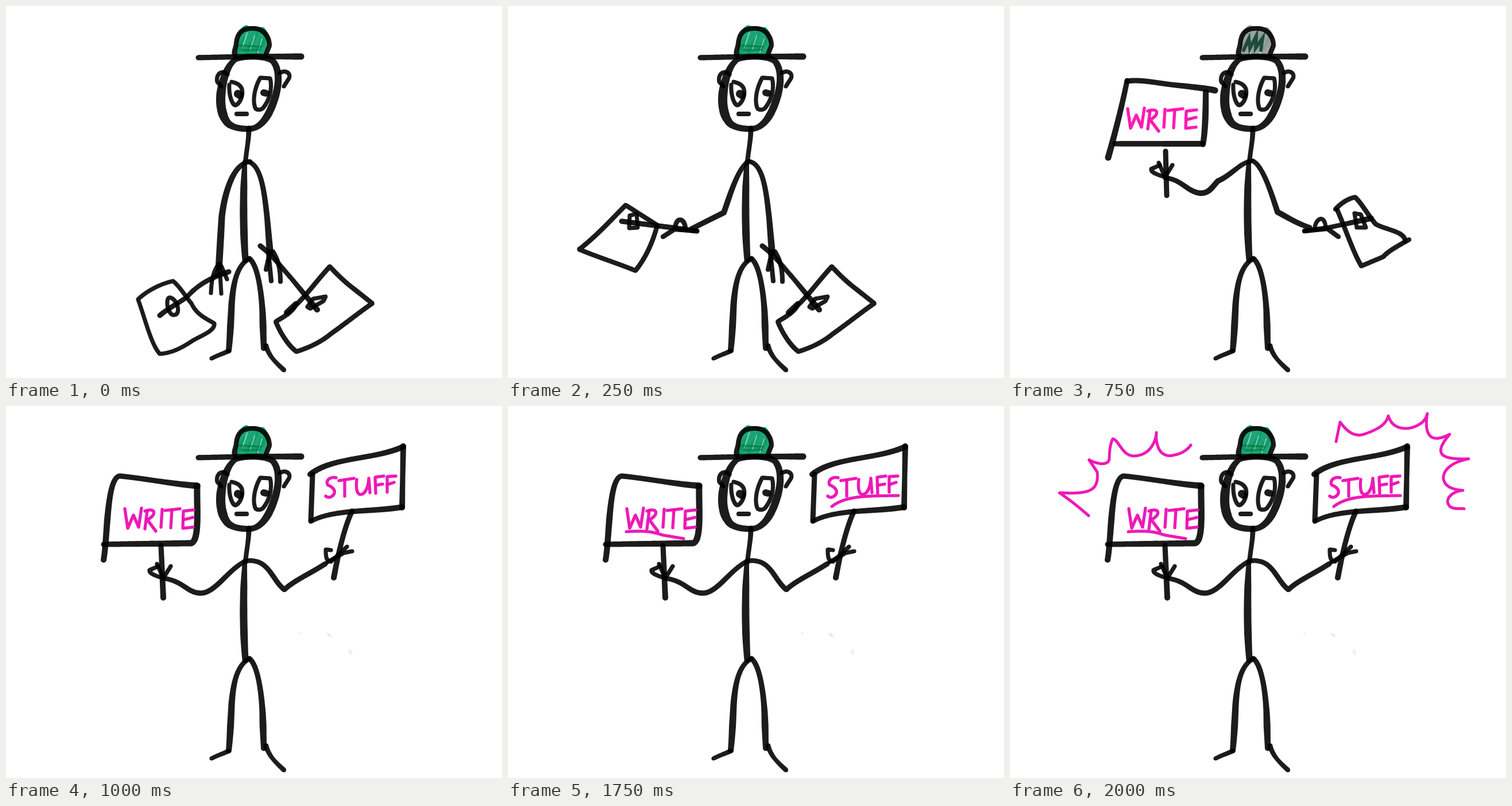
Recreate the animation shown at these times as an HTML page with a canvas. Size 864 by 648 pixels, loop 2.25 s.

```html
<!DOCTYPE html>
<html lang="en">
<head>
<meta charset="utf-8">
<title>Write stuff</title>
<style>
html, body { margin: 0; width: 100%; height: 100%; overflow: hidden; background: #fff; }
canvas { display: block; }
</style>
</head>
<body>
<canvas id="stage" width="864" height="648" role="img" aria-label="Stick figure raising signs: WRITE STUFF"></canvas>
<script>
const ctx = document.getElementById('stage').getContext('2d');
const track = document.createElementNS('http://www.w3.org/2000/svg', 'path');
const INK = 'rgba(0,0,0,.89)', PINK = 'rgba(236,14,180,.95)';
const STEP = 250, LOOP = 2250;
const BLEED = 1.2; // ink spreads a little beyond the nib
let color = INK;

// A marker stroke whose width runs through the given values along the path.
function pen(d, ...widths) {
  track.setAttribute('d', d);
  const length = track.getTotalLength(), last = widths.length - 1;
  const n = Math.max(1, Math.ceil(length / 1.2));
  ctx.fillStyle = color;
  ctx.beginPath();
  for (let i = 0; i <= n; i++) {
    const p = track.getPointAtLength(length * i / n);
    const u = last * i / n, k = Math.min(Math.floor(u), Math.max(0, last - 1));
    const w = last ? widths[k] + (widths[k + 1] - widths[k]) * (u - k) : widths[0];
    const r = (w + BLEED) / 2;
    ctx.moveTo(p.x + r, p.y);
    ctx.arc(p.x, p.y, r, 0, Math.PI * 2);
  }
  ctx.fill();
}
const pens = (w, ...paths) => paths.forEach(d => pen(d, w));

function smudge(x, y, rx, ry, alpha, turn = 0) {
  ctx.save();
  ctx.translate(x, y);
  ctx.rotate(turn);
  ctx.scale(rx, ry);
  const g = ctx.createRadialGradient(0, 0, 0, 0, 0, 1);
  g.addColorStop(0, `rgba(90,90,90,${alpha})`);
  g.addColorStop(1, 'rgba(90,90,90,0)');
  ctx.fillStyle = g;
  ctx.fillRect(-1, -1, 2, 2);
  ctx.restore();
}

function hatFill(grey) {
  ctx.save();
  ctx.clip(new Path2D('M401,85 C400,58 404,37 419,33 L424,36 L449,37 C459,46 460,62 456,72 L453,85 Z'));
  ctx.fillStyle = grey ? '#98a39f' : '#1ba679';
  ctx.fillRect(395, 30, 70, 60);
  ctx.lineCap = 'round';
  for (let i = 0; i < 13; i++) {
    const x = 402 + i * 4.4, y = 42 + (i * 17) % 23;
    ctx.strokeStyle = grey ? (i % 4 ? '#8b9994' : '#c0c9c5') : (i % 3 ? '#149966' : '#8ad6ba');
    ctx.lineWidth = i % 3 ? 3 : 2;
    ctx.beginPath();
    ctx.moveTo(x + 5, y);
    ctx.lineTo(x - 3, y + 24);
    ctx.stroke();
  }
  ctx.strokeStyle = grey ? '#1f4a3c' : 'rgba(0,118,55,.6)';
  ctx.lineWidth = grey ? 6 : 4;
  ctx.stroke(new Path2D(grey
    ? 'M407,77 L416,57 L418,74 L429,52 L428,73 L440,56 L437,77'
    : 'M407,69 L444,71 M411,77 L442,76'));
  ctx.restore();
}

function figure(greyHat) {
  hatFill(greyHat);
  pen('M399,85 C396,81 400,74 401,66 C403,42 417,39 430,39 C451,39 459,56 459,69 L453,84', 8, 7, 7, 7, 7);
  pen('M335,90 L425,88 L514,88', 8, 8, 8, 10);
  pen('M400,93 C383,104 374,140 374,163 C374,186 382,202 390,207 C402,214 414,214 425,214 ' +
      'C450,212 463,179 470,155 C477,130 475,108 465,96 C455,87 420,86 400,93',
      8, 12, 15, 15, 10, 9, 12, 12, 11, 10, 9, 8);
  pens(6, 'M386,119 C375,109 365,121 368,132 L375,140',
      'M477,117 C486,110 497,117 493,126 L484,140',
      'M389,137 C388,152 392,169 399,173 C407,171 414,156 411,145 C408,136 400,134 393,132',
      'M443,125 L460,126 C464,142 460,162 449,176 C446,181 439,182 435,179 C429,168 432,144 443,125');
  pen('M404,153 L407,155', 13);
  pen('M449,151 L453,152', 11);
  pen('M402,188 L419,188', 7);
  pen('M423,213 C423,235 419,250 417,272', 8, 7, 7);
  pen('M416,272 C413,330 413,390 417,442', 7, 11, 12, 12, 10);
  pen('M424,440 C403,451 396,480 393,520 C391,560 390,580 388,600', 7, 8, 10, 11, 9);
  pen('M388,601 C377,606 370,608 358,614', 7, 6);
  pen('M424,440 C439,452 445,500 447,535 L449,596', 8, 8, 9, 11, 9);
  pen('M453,592 C458,610 470,621 484,634', 8, 6, 7);
}

function rightArmDown() {
  pen('M421,271 C445,276 450,325 455,370 L460,430', 7, 8, 9, 11);
  pens(7, 'M460,428 L453,459', 'M457,430 L462,479', 'M465,428 C472,440 478,452 478,480');
  pen('M443,418 C462,432 480,455 500,478 L542,529', 8, 7, 9);
  pens(7, 'M564,454 C580,471 590,480 600,488 L638,518 C615,534 586,557 566,571 C548,586 528,595 506,602 ' +
       'C492,592 478,570 470,550 C480,543 495,537 505,521 C525,502 540,480 564,454');
  pen('M489,534 L505,519', 9);
  pens(6, 'M525,524 L535,510 L557,506 L553,514 L530,527 Z');
}

function leftArmDown() {
  pen('M425,271 C397,274 382,320 376,366 L371,452', 7, 9, 10, 11, 11);
  pens(6, 'M371,449 C360,463 358,480 357,500', 'M371,452 L367,470', 'M372,450 L375,501', 'M375,453 L385,476');
  pen('M388,463 C352,475 333,487 315,507 C300,518 285,525 268,539', 8, 7, 8);
  pens(6, 'M230,511 C242,499 265,485 291,479 C304,490 314,508 323,518 C332,538 350,545 363,553 ' +
       'C364,566 340,574 325,583 C308,594 292,604 268,606 C253,590 243,547 230,511');
  pens(6, 'M284,508 C278,512 281,533 290,538 C300,540 302,529 297,518 C293,511 288,507 284,508');
}

function leftArmSwing() {
  pen('M419,271 C402,280 388,325 376,360 L320,388', 7, 9, 8);
  pens(7, 'M329,392 L290,389 L270,402', 'M309,386 C307,370 294,366 291,386');
  pen('M329,392 L285,386 L198,375', 8);
  pens(7, 'M205,347 L260,382 C250,420 235,445 222,461 C190,448 155,437 124,424 C155,400 180,372 205,347');
  pens(6, 'M212,365 L224,362 L226,386 L211,387 Z');
}

function rightArmSwing() {
  pen('M423,270 C440,278 455,325 466,359 C485,369 500,379 522,386', 7, 8, 9, 8);
  pens(7, 'M513,392 L553,388 L572,402');
  pen('M513,392 L555,386 L629,370', 7, 7, 9);
  pens(6, 'M531,385 C534,369 548,363 550,386', 'M600,361 L611,363 L620,386 L604,386 Z');
  pens(7, 'M567,354 C576,344 588,336 601,333 C612,343 622,362 637,380 C655,390 688,393 688,409',
       'M695,407 C676,418 660,426 650,437 L612,453 C598,429 587,395 570,355');
}

function hand(x, y) {
  pens(6, `M${x},${y} C${x - 16},${y - 5} ${x - 25},${y - 9} ${x - 24},${y - 14} L${x - 9},${y - 21}`,
       `M${x - 11},${y - 25} L${x},${y} L${x + 13},${y - 21}`);
}

// The left sign is redrawn three times, settling at pose 2.
function writeSign(pose) {
  color = INK;
  if (pose === 0) {
    pen('M416,270 C388,291 350,336 322,329 C302,324 292,301 264,297', 7, 8, 8, 8);
    hand(265, 298);
    pen('M270,247 L264,338', 8);
    pen('M200,136 C191,170 183,220 170,252', 8, 9, 10);
    pen('M200,137 L352,148', 8, 10);
    pen('M337,146 L333,242', 9);
    pen('M175,245 L265,243 L333,241', 8, 9);
  } else if (pose === 1) {
    pen('M421,269 C400,274 385,295 362,305 C350,318 346,327 330,326 C307,322 300,303 270,299', 6, 8, 9, 8, 7);
    hand(270, 298);
    pen('M271,253 L273,330', 8);
    pen('M204,130 C195,175 182,225 171,264', 8, 10);
    pen('M204,131 C230,127 262,136 300,139 C325,142 338,143 357,147', 8, 8, 10);
    pen('M341,150 C341,185 340,220 336,241', 9, 10, 9);
    pen('M183,240 L335,240', 8, 9);
  } else {
    pen('M417,270 C385,287 365,325 340,326 C315,326 310,305 274,300', 7, 8, 8, 7);
    hand(274, 300);
    pen('M270,243 L274,334', 8, 9);
    pen('M170,268 C177,230 175,125 198,122 C240,126 290,136 333,139', 9, 10, 8, 8, 10);
    pen('M333,139 C332,175 338,236 322,239 L170,241', 10, 10, 9, 8);
  }
  color = pose === 1 ? 'rgba(255,18,176,.96)' : PINK;
  ctx.save();
  ctx.translate(pose * 2, 0);
  pens(4.2, 'M203,179 L208,213 L218,190 L227,211 L232,178',
       'M242,182 L238,214', 'M238,183 C257,176 259,190 242,198 L257,218',
       'M268,180 L266,211', 'M273,182 L299,179', 'M285,181 L283,212',
       'M323,181 L305,183 L304,213 L322,211', 'M305,198 L322,194');
  ctx.restore();
  color = INK;
}

function stuffSign() {
  pen('M417,270 C458,264 462,302 485,320 C500,305 530,292 556,275', 7, 8, 8, 8);
  pens(6, 'M566,251 L557,250 C557,263 558,270 566,271 L594,245', 'M560,272 L588,256 L603,253');
  pen('M603,183 C592,205 581,245 571,299', 8, 8, 9);
  pen('M534,119 L531,200', 8);
  pen('M530,119 C570,88 640,94 692,71', 9, 8, 8, 9);
  pen('M692,70 L690,177', 9, 8, 9);
  pen('M531,201 C570,179 640,185 690,176', 7, 8, 9);
  color = PINK;
  pens(4.2, 'M575,125 C562,122 556,133 561,138 C572,142 575,150 570,155 C566,160 560,160 557,157',
       'M580,130 L606,126', 'M590,130 L590,157',
       'M611,128 C609,146 612,155 619,154 C627,152 631,140 632,126 L634,151',
       'M644,152 L643,124 L658,122', 'M644,138 L656,136',
       'M664,150 L664,123 L679,122', 'M664,137 L676,133');
  color = INK;
}

function burst() {
  color = PINK;
  pens(3.8, 'M137,191 C121,177 105,164 86,151 C138,154 155,148 152,115 L138,94',
       'M138,94 C151,101 171,105 173,92 C173,78 175,65 179,57 C190,60 195,85 214,87 C235,88 253,72 255,46 ' +
       'C253,76 266,90 284,86 C300,83 309,76 315,68',
       'M568,62 L575,28 C590,48 603,55 620,48 C642,40 655,32 659,17 C664,35 680,42 699,38 ' +
       'C719,32 725,22 727,13 C721,48 731,68 766,49 C738,82 747,94 799,92 ' +
       'C768,98 754,112 755,127 C758,142 774,146 789,147 C769,149 758,162 764,172 C770,181 780,178 791,179');
  color = INK;
}

function draw(scene) {
  ctx.fillStyle = '#fff';
  ctx.fillRect(0, 0, 864, 648);
  if (scene === 2) {
    smudge(205, 350, 13, 18, .32, .5);
    smudge(194, 357, 18, 6, .12);
    smudge(136, 424, 16, 5, .1);
    smudge(300, 388, 48, 9, .1, -.2);
    smudge(376, 430, 4, 18, .09);
    smudge(295, 484, 6, 9, .25, -.5);
    smudge(236, 550, 5, 26, .18, -.3);
    smudge(267, 605, 13, 6, .4);
    smudge(312, 583, 36, 6, .2, -.45);
    smudge(333, 528, 9, 6, .2, .6);
  } else if (scene > 3) {
    smudge(563, 399, 7, 3, .22, .6);
    smudge(600, 429, 4, 8, .14, -.3);
    smudge(513, 396, 4, 2, .16, .4);
  }
  figure(scene === 3);
  if (scene === 0) leftArmDown();
  else if (scene === 1) leftArmSwing();
  else writeSign(Math.min(scene - 2, 2));
  if (scene < 3) rightArmDown();
  else if (scene === 3) rightArmSwing();
  else stuffSign();
  color = PINK;
  if (scene > 4) pen('M206,219 C245,216 257,221 270,225 L306,231', 4);
  if (scene > 5) pen('M564,175 C590,155 630,157 680,156', 4);
  color = INK;
  if (scene === 8) burst();
}

const start = performance.now();
let shown = -1;
function tick() {
  const scene = Math.floor((performance.now() - start) % LOOP / STEP);
  if (scene !== shown) draw(shown = scene);
  requestAnimationFrame(tick);
}
tick();
</script>
</body>
</html>
```
